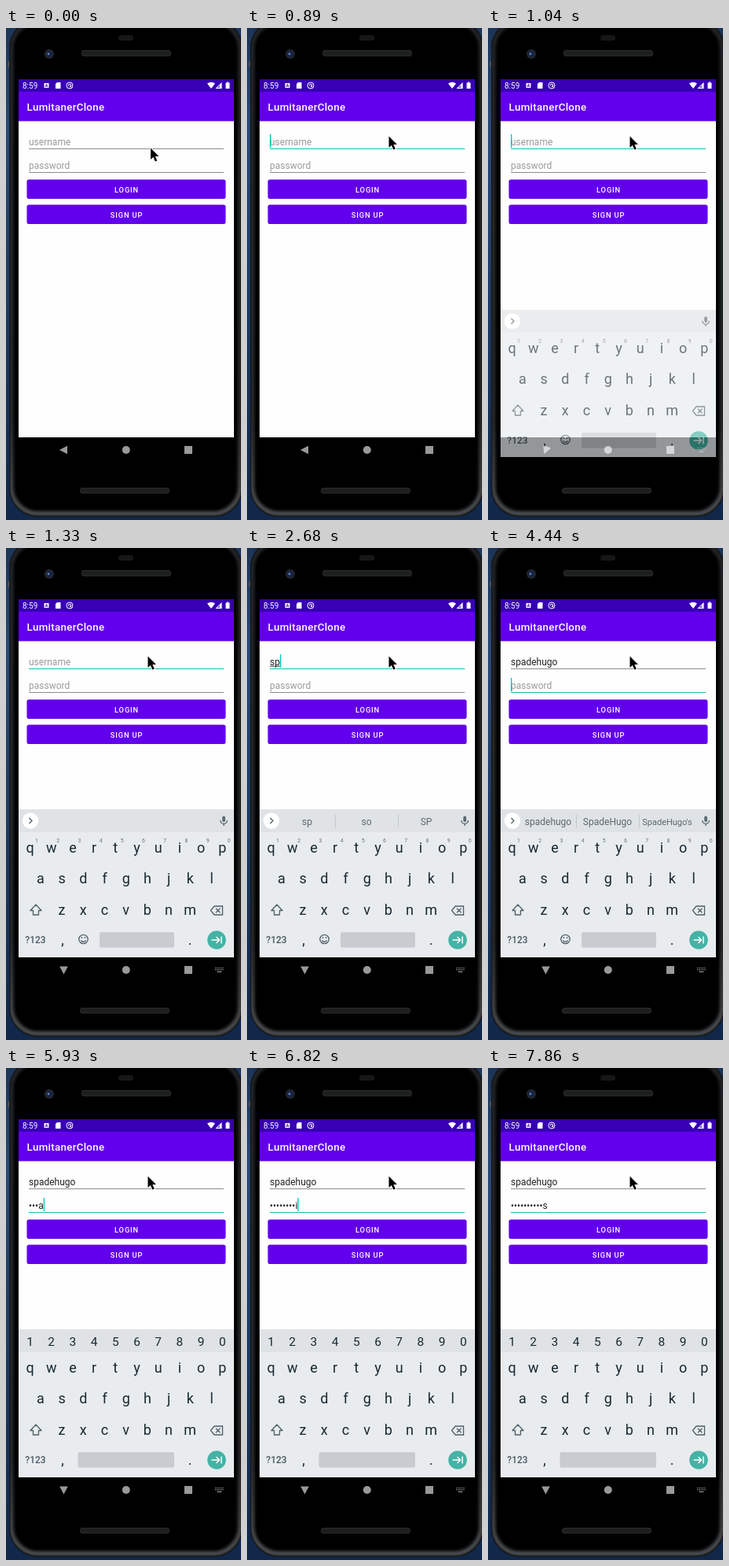
Animation, 299 px wide and 625 px high, one loop 8 s. Source, as an HTML page:

```html
<!DOCTYPE html>
<html lang="en">
<head>
<meta charset="utf-8">
<title>Login screen</title>
<style>
html, body { margin: 0; width: 100%; height: 100%; overflow: hidden; background: #142c50; }
svg { display: block; width: 299px; height: 625px; font-family: Roboto, sans-serif; }
.mid { text-anchor: middle; }
.medium { font-weight: 500; }
.btn { font-size: 9.33px; letter-spacing: .83px; fill: #fff; }
.field { font-size: 12px; }
.key { font-size: 18px; fill: #182830; }
.hint { font-size: 7px; fill: #66747b; }
.digit { font-size: 15.5px; fill: #182830; }
.word { font-size: 12px; fill: #5b686e; }
.icon { fill: none; stroke: #4f5f67; stroke-width: 1.3; }
</style>
</head>
<body>
<svg id="stage" viewBox="0 0 299 625">
  <defs>
    <linearGradient id="desk" x2="0" y2="1">
      <stop offset="0" stop-color="#1c3557"/>
      <stop offset=".2" stop-color="#2b4a78"/>
      <stop offset=".6" stop-color="#1c3962"/>
      <stop offset="1" stop-color="#10274a"/>
    </linearGradient>
    <linearGradient id="sheen" gradientUnits="userSpaceOnUse" x1="0" y1="0" x2="0" y2="620">
      <stop offset="0" stop-color="#2c2e30"/>
      <stop offset=".8" stop-color="#303234"/>
      <stop offset="1" stop-color="#606366"/>
    </linearGradient>
    <filter id="soft" filterUnits="userSpaceOnUse" x="-10" y="-30" width="330" height="670">
      <feGaussianBlur stdDeviation="2"/>
    </filter>
    <clipPath id="body"><rect x="4" y="-11" width="297" height="632" rx="36"/></clipPath>
    <clipPath id="screen"><rect x="16" y="65" width="274" height="480"/></clipPath>
  </defs>

  <rect width="299" height="625" fill="url(#desk)"/>
  <rect x="2.500" y="42" width="4" height="8" rx="1" fill="#55595e"/>
  <g clip-path="url(#body)">
    <rect width="305" height="625" fill="#000"/>
    <rect x="6.500" y="-8" width="291.500" height="625" rx="34" fill="none" stroke="url(#sheen)" stroke-width="5" filter="url(#soft)"/>
    <rect x="4.500" y="-10.500" width="296" height="631" rx="36" fill="none" stroke="#17191b" stroke-width="1.500"/>
  </g>
  <rect x="143" y="9" width="19" height="7" rx="3" fill="#161616"/>
  <g fill="#1d1e1e" stroke="#303131" stroke-width=".8">
    <rect x="96.500" y="28.500" width="113" height="7" rx="2.500"/>
    <rect x="94.500" y="584.500" width="113" height="6.500" rx="2.500"/>
  </g>
  <circle cx="55" cy="33" r="6" fill="#22262e"/>
  <circle cx="55" cy="33" r="3.600" fill="#142348"/>
  <circle cx="54" cy="33" r="1.400" fill="#6283c4"/>

  <rect x="16" y="118" width="274" height="402" fill="#fefefe"/>
  <rect x="16" y="65" width="274" height="16" fill="#3700b3"/>
  <rect x="16" y="81" width="274" height="37.500" fill="#6200ee"/>
  <rect x="16" y="118.500" width="274" height="1" fill="#e4e1e8"/>
  <g fill="#fff">
    <text x="21" y="76.500" font-size="10">8:59</text>
    <rect x="48.500" y="70" width="6" height="6" rx=".6"/>
    <path d="M50 75 51.500 71 53 75M50.500 73.700h2" fill="none" stroke="#3700b3" stroke-width=".8"/>
    <path d="M65 69h4.500v8H63v-6z"/>
    <circle cx="81" cy="73" r="4" fill="none" stroke="#fff"/>
    <path d="M79.300 73a1.800 1.800 0 1 1 1.800 1.800M81 73l2.500 2.500" fill="none" stroke="#fff"/>
    <path d="M256 70.500q5-3.500 10 0l-5 6.500z"/>
    <path d="M274.500 69v8h-8z" fill-opacity=".35"/>
    <path d="M274.500 69v8h-8zM272 72.500v3.500h-3.500z" fill-rule="evenodd"/>
    <path d="M281 68.500h2v1h1.500v7.500h-5v-7.500h1.500z"/>
    <text class="medium" x="26.500" y="105" font-size="13.33" letter-spacing=".3">LumitanerClone</text>
  </g>

  <g fill="#6200ee">
    <rect x="26.500" y="192.500" width="253" height="24.500" rx="2.800"/>
    <rect x="26.500" y="224.500" width="253" height="24.500" rx="2.800"/>
  </g>
  <text class="btn mid medium" x="153.500" y="208.500">LOGIN</text>
  <text class="btn mid medium" x="153.500" y="240.500">SIGN UP</text>

  <rect id="line0" x="29" y="153" width="248" height="1"/>
  <rect id="line1" x="29" y="183" width="248" height="1"/>
  <text id="field0" class="field" x="29" y="148.600"></text>
  <text id="field1" class="field" x="29" y="178.600"></text>
  <rect id="compose" x="29" y="149.700" height=".9" fill="#333"/>
  <rect id="caret" width="1.400" height="17" fill="#03cdb9"/>

  <g clip-path="url(#screen)">
    <g id="keyboard">
      <rect x="16" y="332" width="274" height="188" fill="#e8ecef"/>
      <rect x="16" y="332" width="274" height="29" fill="#dfe3e6"/>
      <g id="letters"></g>
      <path class="icon" d="M38 453 45 460.500H41.500V466H34.500V460.500H31z" stroke-linejoin="round"/>
      <path class="icon" d="M265 455H275.500V466H265L260.500 460.500zM267 457.700l5.500 5.600M272.500 457.700l-5.500 5.600"/>
      <text class="mid medium" x="37.500" y="502" font-size="12" fill="#4a5a62">?123</text>
      <text class="key mid" x="72" y="504">,</text>
      <text class="key mid" x="234" y="504">.</text>
      <rect id="space" y="488" height="19.500" rx="2" fill="#c8ccd0"/>
      <circle cx="268" cy="498" r="11.800" fill="#44b3a5"/>
      <path d="M261.500 498H271M267.500 494l4 4-4 4M274 493.500v9" fill="none" stroke="#fff" stroke-width="1.500"/>
      <g id="textMode">
        <circle cx="31" cy="346.500" r="10.200" fill="#fff"/>
        <path class="icon" d="M29.500 343l3.500 3.500-3.500 3.500"/>
        <rect x="275.200" y="340.500" width="3.800" height="7.500" rx="1.900" fill="#5b686e"/>
        <path class="icon" d="M272.800 346a4.300 4.300 0 0 0 8.600 0M277.100 350.300v2.700"/>
        <g id="words">
          <path d="M112.500 338.500v17M192.500 338.500v17" stroke="#c3c9cd"/>
          <text id="word0" class="word mid" x="76.500" y="351.500"></text>
          <text id="word1" class="word mid" x="152" y="351.500"></text>
          <text id="word2" class="word mid" x="228" y="351.500"></text>
        </g>
        <circle class="icon" cx="98.500" cy="497" r="5.700"/>
        <path class="icon" d="M95.300 498.500q3.200 3.500 6.400 0M96.500 494v2M100.500 494v2"/>
      </g>
      <g id="digits"></g>
    </g>
  </g>

  <g fill="#fff" stroke="none" opacity=".6">
    <path id="back" d="M-5.500 0 4.500-5.300v10.600z"/>
    <circle cx="152.800" cy="536" r="5"/>
    <rect x="227" y="531" width="10" height="10"/>
    <g id="kbIcon" fill="none" stroke="#fff" stroke-width="1.200">
      <path d="M266 533.500h11M266 535.700h11" stroke-dasharray="1.300 1"/>
      <path d="M268.500 538.300h6"/>
    </g>
  </g>

  <path id="mouse" d="M0 0V14.500L3.400 11.400 5.800 17 8.300 15.900 5.900 10.500H10.500z" fill="#000" stroke="#fff" stroke-width="1.800" paint-order="stroke" stroke-linejoin="round"/>
</svg>

<script>
const LOOP = 8000;
const USER = 'spadehugo', PASS = 'lunaparkits';
const el = {};
document.querySelectorAll('[id]').forEach(n => el[n.id] = n);

// Step tables: each row holds from its start time on.
const pointer = [[0, 184, 152.5], [150, 182, 145], [290, 180.5, 137.5]];
const slide = [[0, 26, 0], [1040, 26, .64], [1190, 5, .93], [1330, 0, 1]];
const turn = [[0, 0], [1040, -70], [1190, -87], [1330, -90]];
const focus = [[0, -1], [740, 0], [4440, 1]];
const blink = [[0, 0], [740, 1], [1330, 0], [1930, 1], [2380, 0], [2680, 1],
  [5040, 0], [5190, 1], [7860, 0]];
const typing = [
  [0, 0], [2680, 2, 'sp', 'so', 'SP'], [2830, 3, 'spa', 'space', 'Spa'],
  [3120, 4, 'spad', 'spade', 'Spade'], [3270, 5, 'spade', 'Spade', 'spades'],
  [3410, 6, 'spadeh', 'SpadeHugo', 'spade'], [3560, 7, 'spadehu', 'SpadeHugo', 'spades'],
  [3860, 8, 'spadehug', 'SpadeHugo', 'spades'],
  [4000, 9, USER, 'SpadeHugo', "SpadeHugo's"]
];
const passTimes = [5190, 5480, 5780, 5930, 6230, 6380, 6520, 6670, 6820, 6960, 7260];

const at = (table, t) => table.findLast(row => row[0] <= t);
const set = (node, attrs) => { for (const k in attrs) node.setAttribute(k, attrs[k]); };
const show = (node, on) => { node.style.display = on ? '' : 'none'; };

function label(parent, cls, x, y, text) {
  const n = document.createElementNS('http://www.w3.org/2000/svg', 'text');
  set(n, { class: cls + ' mid', x, y });
  n.textContent = text;
  parent.append(n);
  return n;
}

const hints = [];
[['qwertyuiop', 30.5, 387], ['asdfghjkl', 44, 426], ['zxcvbnm', 71, 465.5]].forEach(([keys, x, y]) =>
  [...keys].forEach((k, i) => label(el.letters, 'key', x + i * 27.2, y, k)));
[...'1234567890'].forEach((d, i) => {
  const x = 30.5 + i * 27.2;
  hints.push(label(el.letters, 'hint', x + 8.5, 373.5, d));
  label(el.digits, 'digit', x, 352.5, d);
});

function drawField(i, text, hint, focused) {
  const node = el['field' + i];
  if (node.textContent !== (text || hint)) node.textContent = text || hint;
  set(node, { fill: text ? '#222' : '#9b9b9b' });
  set(el['line' + i], { fill: focused ? '#12bfae' : '#8c8c8c' });
  return text ? node.getComputedTextLength() : 0;
}

function render(t) {
  const [, mx, my] = at(pointer, t);
  set(el.mouse, { transform: `translate(${mx} ${my})` });

  const active = at(focus, t)[1];
  const [, count, ...words] = at(typing, t);
  const n = passTimes.filter(s => s <= t).length;
  const secret = n ? '•'.repeat(n - 1) + PASS[n - 1] : '';
  const widths = [
    drawField(0, USER.slice(0, count), 'username', active === 0),
    drawField(1, secret, 'password', active === 1)
  ];

  show(el.compose, active === 0 && count);
  set(el.compose, { width: widths[0] });
  show(el.caret, at(blink, t)[1]);
  set(el.caret, { x: 29 + (widths[active] || 0), y: active === 1 ? 165 : 135 });

  const [, dy, alpha] = at(slide, t);
  set(el.keyboard, { transform: `translate(0 ${dy})`, opacity: alpha });
  set(el.kbIcon, { opacity: alpha });
  set(el.back, { transform: `translate(73.5 536) rotate(${at(turn, t)[1]})` });

  const secure = t >= 4590;
  show(el.textMode, !secure);
  show(el.digits, secure);
  hints.forEach(h => show(h, !secure));
  set(el.space, secure ? { x: 91.5, width: 122.5 } : { x: 119, width: 95 });

  show(el.words, words.length);
  words.forEach((w, i) => {
    el['word' + i].textContent = w;
    el['word' + i].style.fontSize = w.length > 10 ? '11px' : '12px';
  });
}

const start = performance.now();
function tick() {
  render((performance.now() - start) % LOOP);
  requestAnimationFrame(tick);
}
tick();
</script>
</body>
</html>
```
